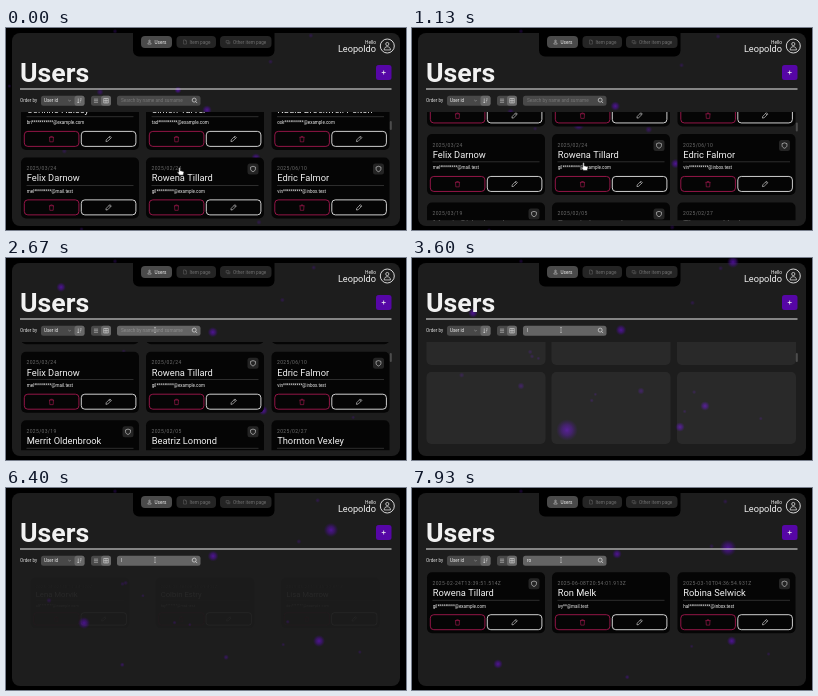
These frames come from a looping animation (400 by 202 pixels, 8000 ms). An HTML page with a canvas:

```html
<!DOCTYPE html>
<html lang="en">
<head>
<meta charset="utf-8">
<title>Users</title>
<style>
  html, body { margin: 0; width: 100%; height: 100%; overflow: hidden; background: #000; }
  canvas { display: block; width: 400px; height: 202px; }
</style>
</head>
<body>
<canvas id="stage"></canvas>
<script>
const LOOP = 8000;
const canvas = document.getElementById('stage');
const ctx = canvas.getContext('2d');
const ratio = window.devicePixelRatio || 1;
canvas.width = 400 * ratio;
canvas.height = 202 * ratio;

// Icons are stroked paths on a 24 unit grid.
const icons = {
  user: 'M8 7a4 4 0 1 0 8 0a4 4 0 1 0-8 0M4 22c0-11 16-11 16 0z',
  page: 'M5 2h9l5 5v15H5zM14 2v5h5',
  cards: 'M3 5h13v11H3zM7 20h14V9',
  trash: 'M3 6h18M9 6V3h6v3M5 6l1 16h12l1-16',
  pencil: 'M3 21l1-6L17 2l5 5L9 20zM14 5l5 5',
  shield: 'M12 2l9 3v7c0 5-4 8-9 10c-5-2-9-5-9-10V5z',
  search: 'M2 10a8 8 0 1 0 16 0a8 8 0 1 0-16 0M16 16l6 6',
  list: 'M3 5h18M3 12h18M3 19h18',
  grid: 'M3 3h18v18H3zM12 3v18M3 12h18',
  sort: 'M7 3v18M3 17l4 4l4-4M14 5h7M14 11h5M14 17h3',
  chevron: 'M5 9l7 7l7-7'
};
for (const name in icons) icons[name] = new Path2D(icons[name]);

const columns = [15, 140, 265.5];
const PITCH = 68.5;
const user = (date, name, mail, shield) => ({ date, name, mail, shield });
const team = [
  user('2025/01/12', 'Corinne Halsey', 'bri***********@example.com'),
  user('2025/01/30', 'Simon Tarver', 'tad**********@example.com'),
  user('2025/02/03', 'Nadia Brockwell Pelton', 'osk**********@example.com'),
  user('2025/03/24', 'Felix Darnow', 'mel*********@mail.test'),
  user('2025/02/24', 'Rowena Tillard', 'gil*********@example.com', true),
  user('2025/06/10', 'Edric Falmor', 'vin**********@inbox.test', true),
  user('2025/03/19', 'Merrit Oldenbrook', 'hob********@mail.test', true),
  user('2025/02/05', 'Beatriz Lomond', 'wes*********@mail.test', true),
  user('2025/02/27', 'Thornton Vexley', 'ned********@example.com')
];
const matchesL = [
  user('2025-04-02T10:12:44.120Z', 'Lena Morvik', 'ulf********@example.com'),
  user('2025-01-18T08:31:09.402Z', 'Colbin Estry', 'fay*******@mail.test'),
  user('2025-05-21T17:45:30.871Z', 'Lisa Marrow', 'dot*******@example.com')
];
const matchesRo = [
  user('2025-02-24T13:39:51.514Z', 'Rowena Tillard', 'gil*********@example.com', true),
  user('2025-06-08T20:54:01.913Z', 'Ron Melk', 'ivy**@mail.test'),
  user('2025-03-10T04:36:54.931Z', 'Robina Selwick', 'hal***********@inbox.test', true)
];

const scrollPath = [[0, 129.5], [800, 118], [1470, 93.8]];
const cursorPath = [[0, 174, 143], [800, 173, 142], [1150, 172, 138], [1470, 160, 82], [1850, 149, 72]];
const typing = [[3150, 'l'], [3750, 'le'], [4050, 'leo'], [4330, 'leop'], [6130, 'leo'],
  [6200, 'le'], [6280, 'l'], [6950, ''], [7150, 'r'], [7400, 'ro']];

// Each glow: time, x, y, radius.
const glows = [
  [[0, 318, -45, 5], [3600, 321, 4, 5], [5000, 327, 25, 5], [6400, 325, 42, 6], [7930, 316, 60, 7]],
  [[0, 201, 82, 4], [1470, 204, 77, 4], [3600, 209, 72, 4.5], [5000, 209, 70, 5], [7930, 205, 66, 4]],
  [[0, 38, -45, 4], [3600, 61, 55, 4], [5000, 69, 95, 5], [6400, 78, 135, 5], [7930, 86, 176, 4]],
  [[0, 250, 130, 4], [3600, 293, 148, 4], [5000, 306, 153, 4.5], [6400, 313, 153, 5], [8000, 320, 153, 4]],
  [[0, 226, 105, 4], [3600, 268, 169, 4], [5000, 284, 195, 5], [6400, 300, 221, 4]],
  [[0, 172, 62, 3], [3600, 155, 172, 9], [4600, 149, 208, 5]],
  [[0, 94, 64, 3], [1470, 100, 90, 3], [3600, 109, 128, 3], [5000, 113, 152, 2], [8000, 120, 205, 2]],
  [[0, 239, 90, 3], [1470, 236, 105, 3], [3600, 229, 133, 3], [8000, 215, 190, 2]]
];

const random = n => { const v = Math.sin(n * 91.7) * 43758.5; return v - Math.floor(v); };
const progress = (t, from, to) => Math.min(1, Math.max(0, (t - from) / (to - from)));
const ease = p => p * p * (3 - 2 * p);

function along(points, t) {
  let i = 1;
  while (i < points.length - 1 && points[i][0] < t) i++;
  const a = points[i - 1], b = points[i], p = progress(t, a[0], b[0]);
  return a.slice(1).map((v, k) => v + (b[k + 1] - v) * p);
}

function box(x, y, w, h, r, fill, stroke) {
  ctx.beginPath();
  ctx.roundRect(x, y, w, h, r);
  if (fill) { ctx.fillStyle = fill; ctx.fill(); }
  if (stroke) { ctx.strokeStyle = stroke; ctx.lineWidth = 0.9; ctx.stroke(); }
}

function text(str, x, y, size, color, { weight = 400, align = 'left', spacing = 0 } = {}) {
  ctx.font = `${weight} ${size}px Roboto, sans-serif`;
  ctx.textAlign = align;
  ctx.letterSpacing = spacing + 'px';
  ctx.fillStyle = color;
  ctx.fillText(str, x, y);
}

function icon(name, cx, cy, size, color = '#eee', width = 2) {
  ctx.save();
  ctx.translate(cx - size / 2, cy - size / 2);
  ctx.scale(size / 24, size / 24);
  ctx.strokeStyle = color;
  ctx.lineWidth = width;
  ctx.stroke(icons[name]);
  ctx.restore();
}

function glow(x, y, r, alpha) {
  const g = ctx.createRadialGradient(x, y, 0, x, y, r * 1.2);
  g.addColorStop(0, `rgba(92,18,178,${alpha})`);
  g.addColorStop(0.5, `rgba(76,16,150,${alpha * 0.7})`);
  g.addColorStop(1, 'rgba(60,10,130,0)');
  ctx.fillStyle = g;
  ctx.fillRect(x - r * 1.2, y - r * 1.2, r * 2.4, r * 2.4);
}

function drawGlows(t) {
  for (const path of glows) {
    const [x, y, r] = along(path, t);
    glow(x, y, r, r > 3 ? 0.8 : 0.45);
  }
  for (let i = 1; i <= 16; i++) {
    const drift = t / 1000 * (random(i + 40) - 0.5) * 14;
    glow(random(i) * 400 + drift, random(i + 20) * 202 + drift * 0.7, 1.5 + random(i + 60), 0.3);
  }
}

function drawHeader() {
  box(127, -8, 141.5, 36.5, 6, '#000');
  box(135, 8, 31, 12, 4, '#4a4a4a');
  box(170.5, 8, 39.5, 12, 4, '#242424');
  box(214, 8, 51.5, 12, 4, '#242424');
  icon('user', 143.5, 14, 5);
  text('Users', 148.5, 15.8, 4.7, '#eee');
  icon('page', 179, 14, 5, '#707070');
  text('Item page', 183.5, 15.8, 4.7, '#707070');
  icon('cards', 222, 14, 5, '#707070');
  text('Other item page', 227, 15.8, 4.7, '#707070');

  text('Users', 14, 54, 26.7, '#f2f2f2', { weight: 700 });
  text('Hello', 370, 16, 4.8, '#eee', { align: 'right' });
  text('Leopoldo', 370, 24, 9.2, '#f2f2f2', { align: 'right' });
  box(374.3, 11, 14, 14, 7, null, '#eee');
  icon('user', 381.3, 18, 9.5, '#eee', 1.8);
  box(370, 37, 15.5, 15, 2.5, '#5606a6');
  ctx.fillStyle = '#eee';
  ctx.fillRect(375.7, 44.1, 4, 0.8);
  ctx.fillRect(377.3, 42.5, 0.8, 4);
  ctx.fillRect(14, 60.5, 371.5, 1);
}

function drawFilters(t) {
  text('Order by', 14, 74.3, 4.6, '#ddd');
  box(35, 67.7, 43.5, 10, 2.5, '#484848');
  box(68.5, 67.7, 10, 10, 2.5, '#686868');
  text('User id', 38, 74.3, 4.6, '#eee');
  icon('chevron', 63.5, 72.5, 4);
  icon('sort', 73.5, 72.7, 6);
  box(85, 67.7, 20, 10, 2.5, '#484848');
  box(95, 67.7, 10, 10, 2.5, '#686868');
  icon('list', 90, 72.7, 5.5);
  icon('grid', 100, 72.7, 6);

  const focused = t > 2100;
  box(111, 67.7, 83.5, 10, 2.5, focused ? '#646464' : '#484848');
  icon('search', 188.7, 72.6, 6, '#f2f2f2', 2.4);
  const step = typing.filter(s => s[0] <= t).pop();
  const query = step ? step[1] : '';
  if (query) text(query, 115, 74.4, 4.7, '#f2f2f2');
  else text('Search by name and surname', 115, 74.4, 4.7, focused ? '#8e8e8e' : '#777');
}

function drawCard(x, y, { date, name, mail, shield }, scale = 1) {
  ctx.save();
  ctx.translate(x + 59, y + 30.5);
  ctx.scale(scale, scale);
  ctx.translate(-59, -30.5);
  box(0, 0, 118, 61, 5, '#050505');
  text(date, 5.5, 12.6, 5, '#6c6c6c', { spacing: 0.35 });
  text(name, 5.7, 24, 9.3, '#f2f2f2');
  ctx.fillStyle = '#555';
  ctx.fillRect(5.5, 27.6, 107, 0.5);
  text(mail, 5.7, 35.3, 4.5, '#eee');
  box(3.3, 42.4, 54.6, 15, 3.5, null, '#a3184f');
  box(60.3, 42.4, 54.6, 15, 3.5, null, '#e6e6e6');
  icon('trash', 30.5, 50, 6.8, '#b51c58');
  icon('pencil', 87.5, 50, 6.8);
  if (shield) {
    box(101.5, 6, 11, 11, 2.5, '#242424');
    icon('shield', 107, 11.5, 6.5);
  }
  ctx.restore();
}

function drawResults(users, shown, hidden) {
  const alpha = shown * shown * (1 - hidden);
  if (!alpha) return;
  ctx.globalAlpha = alpha;
  users.forEach((u, i) => drawCard(columns[i], 84.3, u, 0.8 + 0.2 * ease(shown)));
  ctx.globalAlpha = 1;
}

function drawList(t) {
  ctx.save();
  ctx.beginPath();
  ctx.rect(6, 84, 388, 108.3);
  ctx.clip();

  const listAlpha = 1 - progress(t, 3280, 3480);
  if (listAlpha) {
    const top = along(scrollPath, t)[0] - PITCH;
    ctx.globalAlpha = listAlpha;
    team.forEach((u, i) => drawCard(columns[i % 3], top + Math.floor(i / 3) * PITCH, u));
  }

  const skeleton = progress(t, 3300, 3500) * (1 - progress(t, 4400, 4600));
  if (skeleton) {
    ctx.globalAlpha = skeleton;
    for (const y of [35, 114])
      for (const x of columns) box(x - 0.5, y, 119, 72, 5, 'rgba(255,255,255,0.055)');
  }

  ctx.globalAlpha = progress(t, 4560, 4900) * (1 - progress(t, 6150, 6350));
  text('No results found', 200.5, 134.5, 26.7, '#0c0c0c', { weight: 700, align: 'center' });
  ctx.globalAlpha = 1;

  drawResults(matchesL, progress(t, 6300, 6700), progress(t, 7150, 7400));
  drawResults(matchesRo, progress(t, 7480, 7880), 0);
  ctx.restore();

  if (t < 4500) box(383.8, 93 + progress(t, 0, 1470) * 2, 2, 9, 1, '#4c4c4c');
}

function drawCursor(t) {
  const [x, y] = along(cursorPath, t);
  ctx.save();
  ctx.translate(x, y);
  ctx.strokeStyle = '#111';
  ctx.lineWidth = 0.6;
  ctx.fillStyle = '#fff';
  if (y > 84) {
    const hand = new Path2D('M-1.3-3q.8-1.2 1.5 0v2.6l3.2.8q.6.3.5 1.2l-.7 2.6h-3.8l-2.2-3q.2-1 1.5 0z');
    ctx.fill(hand);
    ctx.stroke(hand);
  } else if (y > 76) {
    const arrow = new Path2D('M0-2v6l1.4-1.2l1 2.2l1-.5l-1-2.1h1.9z');
    ctx.fill(arrow);
    ctx.stroke(arrow);
  } else {
    ctx.strokeStyle = '#bbb';
    ctx.stroke(new Path2D('M-1-2.5h2M0-2.5v5M-1 2.5h2'));
  }
  ctx.restore();
}

function draw(now) {
  const t = now % LOOP;
  ctx.setTransform(ratio, 0, 0, ratio, 0, 0);
  ctx.fillStyle = '#000';
  ctx.fillRect(0, 0, 400, 202);
  box(6, 5, 388, 193, 8, '#1d1d1d');
  drawGlows(t);
  drawHeader();
  drawFilters(t);
  drawList(t);
  drawCursor(t);
  requestAnimationFrame(draw);
}
requestAnimationFrame(draw);
</script>
</body>
</html>
```
